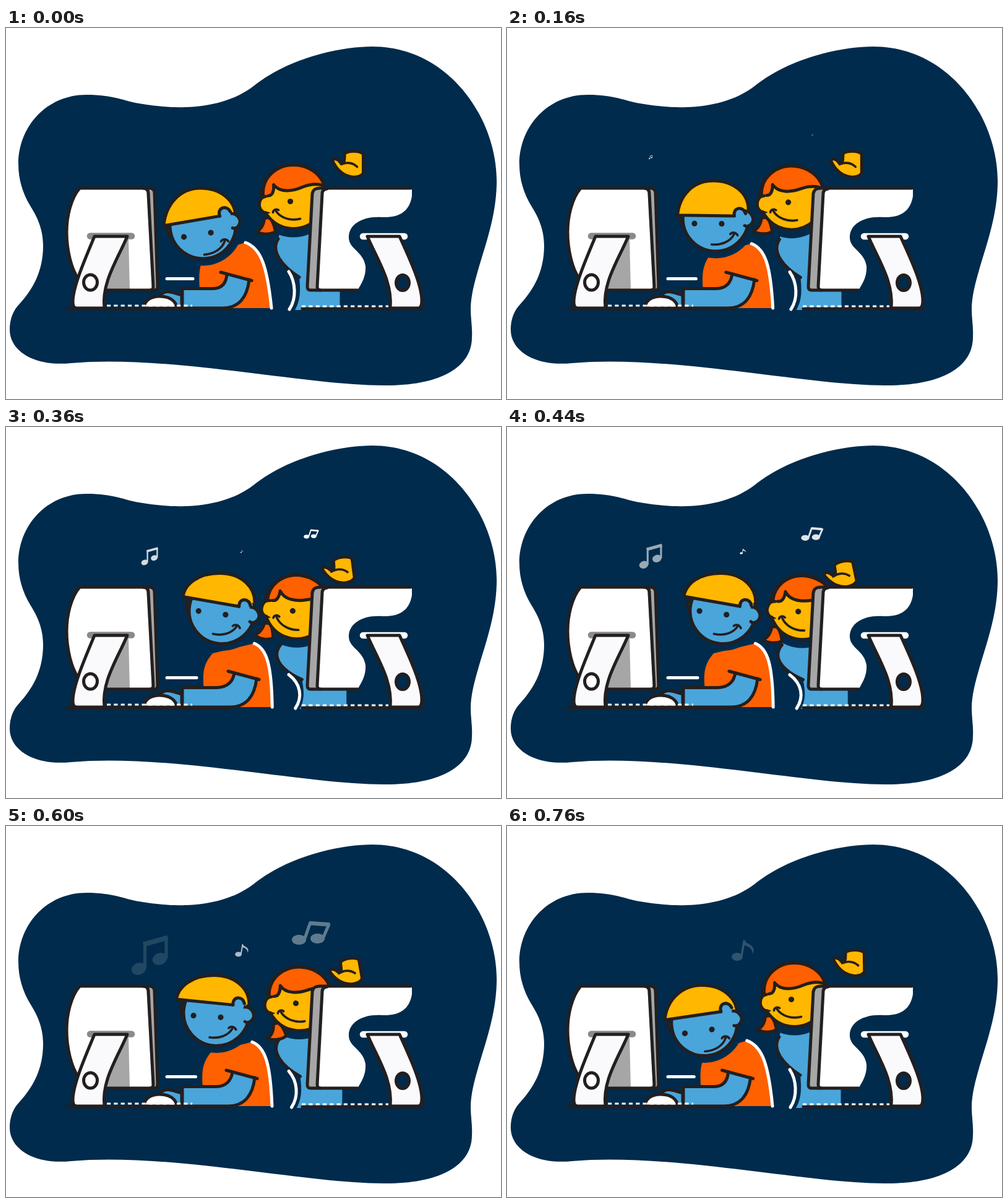
An HTML page for the animation above (800 ms loop, 800 by 600 pixels).

```html
<!DOCTYPE html>
<html lang="en">
<head>
<meta charset="utf-8">
<title>Two friends at their computers</title>
<style>
  html, body { margin: 0; width: 100%; height: 100%; overflow: hidden; background: #fff; }
  svg { display: block; width: 100vw; height: 100vh; }
  .line { fill: none; stroke: #231f20; stroke-width: 5; stroke-linecap: round; stroke-linejoin: round; }
  .edge { stroke: #231f20; stroke-width: 5; stroke-linecap: round; stroke-linejoin: round; }
  .thin { stroke-width: 3.6; }
  .chalk { fill: none; stroke: #fff; stroke-width: 5; stroke-linecap: round; }
  .dash { fill: none; stroke: #fff; stroke-width: 3.2; stroke-dasharray: 6.2 5.1; }
  .bar { fill: none; stroke-width: 10.5; stroke-linecap: round; }
  .navy { fill: #002b4c; }
  .blue { fill: #4aa5da; }
  .gold { fill: #ffb700; }
  .orange { fill: #ff6000; }
  .white { fill: #fff; }
  .stand { fill: #fafafc; }
  .grey { fill: #a6a6a6; }
  .ink { fill: #231f20; }
  .note { fill: #fff; }
  .note path.s { fill: none; stroke: #fff; stroke-linejoin: round; }
</style>
</head>
<body>
<svg viewBox="0 0 800 600" xmlns="http://www.w3.org/2000/svg">
  <path class="navy" d="M400,94 C460,46 545,30 592,30 C715,30 793,145 793,248 C793,330 751,400 751,455 C751,470 754,485 753,500 C753,550 700,579 610,578 C475,577 262,528 105,542 C45,548 6,522 6,488 C6,470 12,456 22,446 C42,424 60,395 60,352 C60,325 50,305 40,289 C27,268 20,245 20,220 C20,160 65,108 130,108 C175,108 190,118 215,122 C245,127 270,129 290,128 C330,127 370,117 400,94Z"/>

  <!-- left computer -->
  <path class="line" d="M99,454 H365"/>
  <path class="white" d="M119,259 H230 L237,424 H125 L117,406 C106,390 98,360 98,330 C98,305 105,275 119,259Z"/>
  <path class="grey" d="M165,341 H198 L200,423 H158Z"/>
  <path class="grey" d="M227,259 H233 Q240,260 240,267 L245,418 Q245,424 240,424 H236Z"/>
  <path class="line" d="M116,404 C106,390 98,360 98,330 C98,305 105,275 119,259 H233 Q240,260 240,267 L245,418 Q245,424 240,424 H160"/>
  <path class="line" d="M222,259 Q230,260 230,267 L238,418 Q238,424 233,424"/>
  <path class="bar" stroke="#8b8989" d="M136,336.500 H203"/>
  <path class="edge stand" d="M143,337 H196 C180,375 154,412 159,453 H114 Q108,453 108,443 C108,420 125,380 143,337Z"/>
  <ellipse class="edge white" cx="136.500" cy="411.500" rx="11" ry="12.500"/>

  <!-- boy's body -->
  <path id="keys" class="chalk"/>
  <path id="torso" class="orange"/>
  <circle id="boyGap" class="navy" r="64.500"/>
  <path id="back" class="chalk"/>
  <path class="edge blue" d="M250,431 C258,424 264,426 284,432 V451 H270Z"/>
  <path id="arm" class="blue"/>
  <path id="armLine" class="line"/>
  <path id="sleeve" class="line"/>
  <path class="edge white" d="M223,453 C223,441 234,434 248,434 C264,434 275,441 276,453Z"/>
  <path class="dash" d="M163,449 H301"/>

  <!-- girl -->
  <path id="dress" class="blue"/>
  <circle id="girlGap" class="navy" r="66"/>
  <path id="dressLine" class="line"/>
  <path id="girlBack" class="chalk"/>
  <path id="tail" class="edge orange" d="M-60,57 C-52,53 -48,46 -47,35 L-38,34 C-32,42 -30,50 -29,57 C-38,62 -50,62 -60,57Z"/>
  <g id="girl">
    <circle class="edge gold" r="52"/>
    <path class="orange" d="M-49,0 C-51,-30 -28,-51 0,-51 C24,-51 44,-37 50,-17 C38,-22 26,-20 14,-15 C-2,-8 -22,-6 -32,-19 C-31,-9 -34,-1 -42,-1Z"/>
    <path class="line" d="M-49,-2 C-51,-30 -28,-51 0,-51 C24,-51 44,-37 50,-17 C38,-22 26,-20 14,-15 C-2,-8 -22,-6 -32,-19 C-31,-9 -34,-1 -41,-1"/>
    <path class="edge gold" d="M-45,0 C-56,1 -59,18 -49,25 C-46,27 -43,26 -40,25"/>
    <path class="gold" d="M-45,2.500 L-34,0 V27 L-44,24Z"/>
    <circle class="ink" cx="-5" cy="8" r="4.600"/>
    <path class="line thin" d="M-28,24 C-20,35 -4,40 11,36 M-33,26 C-33,22 -28,19 -24,22"/>
  </g>
  <g id="hand">
    <path class="edge gold" d="M16,-13 C24,-18 40,-17 46,-12 V19 C43,25 32,27 25,25 C12,22 2,12 -4,-1 C-2,-6 5,-4 9,2 L14,3 C16,-1 15,-7 16,-13Z"/>
    <path class="line thin" d="M10,5 C19,1 29,2 36,9"/>
  </g>

  <!-- right computer -->
  <path class="line" d="M479,454 H672"/>
  <path class="white" d="M508,259 H656 V272 C652,298 634,307 608,306 C575,304 555,318 554,337 C553,358 577,360 581,385 C582,400 576,412 568,424 H496Z"/>
  <path class="grey" d="M519,259 H508 C499,259 496,262 495,268 L487,418 Q487,424 492,424 H504 L512,266Z"/>
  <path class="line" d="M654,259 H508 C499,259 496,262 495,268 L487,418 Q487,424 492,424 H568"/>
  <path class="line" d="M519,260 Q511,261 511,268 L503,418 Q503,424 508,424"/>
  <path class="bar" stroke="#fff" d="M577,337 H644"/>
  <path class="edge stand" d="M584,337 H636 C652,372 672,415 672,441 Q672,453 666,453 H621 C625,410 600,375 584,337Z"/>
  <ellipse class="edge navy" cx="641" cy="412" rx="10.500" ry="12.500"/>
  <path class="dash" d="M478,450 H618"/>

  <!-- boy's head -->
  <g id="boy">
    <path class="edge blue" d="M-50,-15 C-60,-14 -60,6 -52,9Z"/>
    <circle class="edge blue" r="53"/>
  </g>
  <path id="hat" class="gold"/>
  <path id="hatLine" class="line"/>
  <g id="lobe">
    <path class="edge blue" d="M42,-12 C56,-16 66,0 57,9 C54,12 50,13 47,11"/>
  </g>
  <g id="curl">
    <path class="blue" d="M0,0 C-3,-14 14,-17 18,-4 L16,14 L2,10Z"/>
    <path class="line" d="M0,0 C-3,-14 14,-17 18,-4"/>
  </g>
  <g id="look">
    <circle class="ink" cx="-22" r="4.600"/>
    <circle class="ink" cx="22" r="4.600"/>
    <path class="line thin" d="M6,33.500 C21,35 36,29 42,17 M36,16.500 C39,13 45,13 48,18.500"/>
  </g>

  <!-- notes -->
  <g id="noteA" class="note">
    <ellipse rx="12" ry="9.500" transform="translate(-17.500 22) rotate(-20)"/>
    <ellipse rx="12" ry="9.500" transform="translate(16.500 6) rotate(-20)"/>
    <path class="s" stroke-width="5" d="M-7.500,21 V-19 M27,5 V-28"/>
    <path class="s" stroke-width="8" d="M-10,-17.500 L29.500,-28.500"/>
  </g>
  <g id="noteB" class="note">
    <ellipse cx="-20" cy="11" rx="11.500" ry="8"/>
    <ellipse cx="10" cy="9" rx="11.500" ry="8"/>
    <path class="s" stroke-width="5" d="M-11,10 L-2,-16 L28,-13 L19,8"/>
    <path class="s" stroke-width="6.500" d="M-3,-16 L30,-13.500"/>
  </g>
  <g id="noteC" class="note">
    <ellipse cx="-9" cy="10" rx="9" ry="6.500"/>
    <path class="s" stroke-width="3.500" d="M-2,9 L2.500,-17"/>
    <path d="M1,-18 C6,-9 23,-10 16,6 C16,-4 9,-7 1,-9Z"/>
  </g>
</svg>
<script>
const LOOP = 800, STEP = 40;
const $ = id => document.getElementById(id);
const draw = (id, d) => $(id).setAttribute('d', d);
const mix = (a, b, u) => a + (b - a) * u;

// Loop-long swell from 0 to 1 and back, lingering at the top.
function swell(t, lag = 0) {
  const low = (1 + Math.cos(2 * Math.PI * (t - lag) / LOOP)) / 2;
  return 1 - low * low;
}

// Single soft bump around one moment.
function pulse(t, mid, half) {
  const d = Math.abs(t - mid) / half;
  return d < 1 ? Math.cos(d * Math.PI / 2) ** 2 : 0;
}

function place(id, x, y, a = 0, k = 1) {
  $(id).setAttribute('transform', `translate(${x} ${y}) rotate(${a}) scale(${k})`);
}

function drawBoy(t) {
  const s = 12 * swell(t);
  const ahead = swell(t, -20), behind = swell(t, 8);

  // body
  const x = 387 + 1.2 * s, y = 347 + .25 * s;
  const back = `C${412 + .8 * s},${356 + .2 * s} ${422 + .6 * s},385 ${429 + .1 * s},453`;
  draw('keys', `M260,405.5 H${302 + .5 * s}`);
  draw('torso', `M${313 + .55 * s},422 C${311 + .5 * s},395 ${313 + .6 * s},382 ${322 + s},366
    L${x},${y} ${back} H350Z`);
  draw('back', `M${x},${y} ${back}`);
  const top = `M285,450 V421.5 H${335 + .5 * s} C${350 + .7 * s},421 ${356 + .9 * s},411 ${357 + s},398`;
  const low = `${393 + s},407 C${390 + s},433 ${378 + s},453 ${350 + s},453`;
  draw('arm', `${top} L${low} H285Z`);
  draw('armLine', `${top} M${low} H285`);
  draw('sleeve', `M${347 + s},395 L${397 + s},408.5`);

  // head
  const fx = mix(318, 349, swell(t, -10)), fy = mix(320, 297.5, behind);
  const turn = mix(-9, 7.8, swell(t));
  place('boyGap', fx, fy);
  place('boy', fx, fy, turn);
  place('lobe', fx, fy, turn);
  place('look', mix(309, 333, ahead), mix(334.5, 300.5, behind), turn);

  // the hat's band tilts on its own, its dome follows the head
  const tilt = mix(-9.8, 10, behind), rad = tilt * Math.PI / 180;
  const hx = mix(254.5, 286, ahead), hy = mix(321.5, 274, swell(t, 35));
  const ex = hx + 92 * Math.cos(rad), ey = hy + 92 * Math.sin(rad);
  const tx = fx - 4, ty = fy - 61;
  const dome = `C${hx + 3},${mix(hy, ty, .55)} ${tx - 34},${ty} ${tx},${ty}
    C${tx + 32},${ty} ${fx + 53},${fy - 42} ${fx + 53},${fy - 14}`;
  draw('hat', `M${hx},${hy} ${dome} L${ex},${ey}Z`);
  draw('hatLine', `M${ex},${ey} L${hx},${hy} ${dome}`);
  place('curl', ex, ey, tilt);
}

function drawGirl(t) {
  const duck = pulse(t, 412, 310), nod = pulse(t, 382, 335), wave = pulse(t, 500, 310);
  const gx = 464.5 - 8 * pulse(t, 225, 140) + 15 * pulse(t, 500, 240);
  const gy = 272.5 + 19.5 * duck, g = 11.5 * duck;

  const side = `M${440 + .4 * g},${341 + g} C${427 + .2 * g},${361 + .8 * g}
    ${446 - .5 * g},${385 + .6 * g} ${474 + .4 * g},${403 + .5 * g}`;
  draw('dress', `${side} C${476 + .5 * g},425 ${476 + .7 * g},440 ${467 + .7 * g},456
    H${539.5 + g} V420 H490 L492,300 H450Z`);
  draw('dressLine', side);
  draw('girlBack', `M457,${394 + .6 * g} C${468 + .8 * g},${411 + .4 * g}
    ${470 + .9 * g},437 ${458 + .9 * g},455`);

  place('girlGap', gx, gy);
  place('girl', gx, gy, 13 * nod);
  place('tail', gx, gy, 11.5 * pulse(t, 310, 220) - 8 * pulse(t, 610, 160));
  place('hand', 531.5 - 16.5 * nod, 215.5 + 26 * wave, -13 * wave);
}

function note(id, x, y, t, start, full, power, fade, span) {
  const size = t > start ? ((t - start) / (full - start)) ** power : 0;
  const alpha = Math.max(0, Math.min(1, 1 - (t - fade) / span));
  place(id, x, y, 0, size);
  $(id).setAttribute('opacity', size > 0 ? alpha : 0);
}

function render(t) {
  drawBoy(t);
  drawGirl(t);
  note('noteA', 232, 209, t, 70, 600, 1.3, 300, 345);
  note('noteB', 493.5, 173, t, 110, 600, 1.4, 400, 320);
  note('noteC', 381, 201.5, t, 240, 760, 1.4, 500, 320);
}

const begin = performance.now();
function tick(now) {
  const t = Math.max(0, now - begin) % LOOP;
  render(Math.floor(t / STEP + 1e-6) * STEP % LOOP);
  requestAnimationFrame(tick);
}
render(0);
requestAnimationFrame(tick);
</script>
</body>
</html>
```
